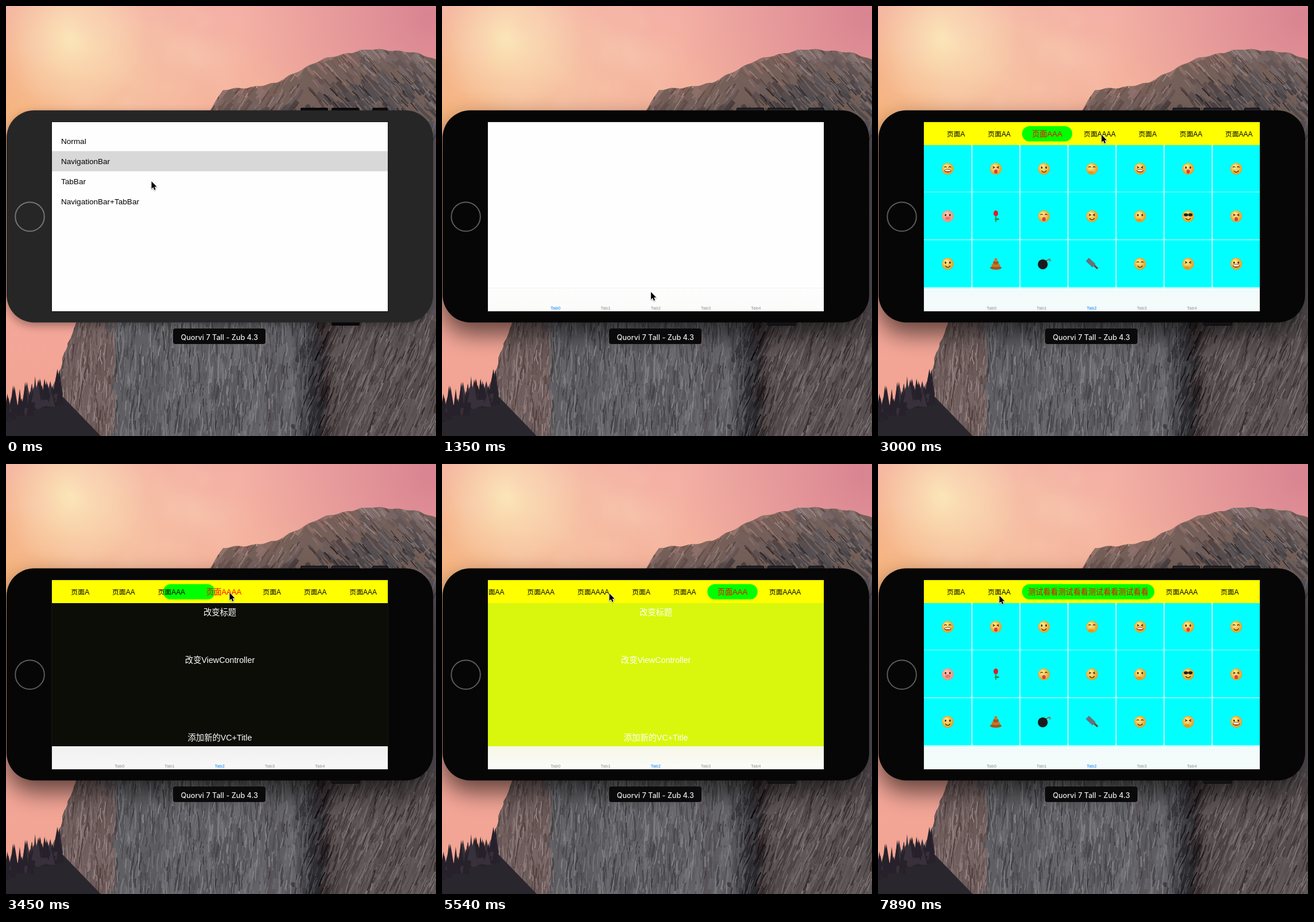
An HTML page with a canvas that plays this animation: 749x748 px, repeating every 8 s.

```html
<!DOCTYPE html>
<html lang="zh">
<head>
<meta charset="utf-8">
<title>Paging tabs</title>
<style>
  html, body { margin: 0; width: 100%; height: 100%; overflow: hidden; background: #f4ab97; }
  canvas { display: block; }
</style>
</head>
<body>
<canvas id="stage" width="749" height="748"></canvas>
<script>
const W = 749, H = 748, LOOP = 8000;
const FONT = '"Liberation Sans", Arial, "Noto Sans CJK SC", "Noto Sans CJK", sans-serif';
const SCREEN = { x: 80, y: 202, w: 585, h: 329 };
const PAGE_TOP = 242, BAR_TOP = 491;
const SIZE = 11.92, PAD = 19.88;
const stage = document.getElementById('stage').getContext('2d');
let g = stage;

// ---------- helpers ----------
const clamp = (v, a, b) => Math.max(a, Math.min(b, v));
const mix = (a, b, p) => a + (b - a) * p;
const ease = p => (1 - Math.cos(Math.PI * clamp(p, 0, 1))) / 2;
const times = (n, f) => Array.from({ length: n }, (_, i) => f(i));

let seed = 11;
function rnd(a = 0, b = 1) {
  seed = (seed * 16807) % 2147483647;
  return mix(a, b, seed / 2147483647);
}
function trace(pts) {
  g.beginPath();
  pts.forEach(([x, y]) => g.lineTo(x, y));
}
function poly(pts, fill) { trace(pts); g.fillStyle = fill; g.fill(); }
function line(pts, color, width = 1) {
  trace(pts);
  g.strokeStyle = color; g.lineWidth = width; g.stroke();
}
function rect(x, y, w, h, fill) { g.fillStyle = fill; g.fillRect(x, y, w, h); }
function round(x, y, w, h, r, fill) {
  g.beginPath(); g.roundRect(x, y, w, h, r);
  g.fillStyle = fill; g.fill();
}
function disc(x, y, r, fill, ry = r) {
  g.beginPath(); g.ellipse(x, y, r, ry, 0, 0, 7);
  g.fillStyle = fill; g.fill();
}
function arc(x, y, r, a, b, color, width = 1) {
  g.beginPath(); g.arc(x, y, r, a, b);
  g.strokeStyle = color; g.lineWidth = width; g.stroke();
}
function text(s, x, y, size, color, align = 'center') {
  g.font = size + 'px ' + FONT;
  g.textAlign = align;
  g.fillStyle = color;
  g.fillText(s, x, y + size * 0.36);
}
function glow(x, y, r, rgb, alpha) {
  const f = g.createRadialGradient(x, y, 0, x, y, r);
  f.addColorStop(0, `rgba(${rgb},${alpha})`);
  f.addColorStop(1, `rgba(${rgb},0)`);
  rect(x - r, y - r, 2 * r, 2 * r, f);
}
function ramp(y0, y1, ...colors) {
  const f = g.createLinearGradient(0, y0, 0, y1);
  colors.forEach((c, i) => f.addColorStop(i / (colors.length - 1), c));
  return f;
}
function layer(paint) {
  const c = document.createElement('canvas');
  c.width = W; c.height = H;
  g = c.getContext('2d');
  paint();
  g = stage;
  return c;
}

// ---------- wallpaper ----------
// A parabolic dome meets a gentle shoulder, which drops off steeply on the left.
function ridge(x) {
  const dome = 76 + 0.0018 * (x - 652) ** 2;
  const shoulder = 147 - 0.13 * (x - 378);
  const rough = Math.sin(x / 5) + Math.sin(x / 13);
  return (x < 378 ? 147 + (378 - x) * 1.5 : Math.min(dome, shoulder)) + rough;
}
function rockColor(x, y, jitter) {
  let light, warm;
  if (y < 200) {
    const depth = (y - ridge(x)) / 60;
    warm = clamp(32 - 20 * depth, 8, 32) * (x < 600 ? 1 : 0.6);
    light = 112 - 34 * clamp(depth, 0, 1);
  } else {
    const cleft = Math.exp(-(((x - 545) / 30) ** 2));
    warm = x < 190 ? 16 : x > 560 ? 8 : 0;
    light = (x < 545 ? 97 : 82) - 45 * cleft;
  }
  const v = light + jitter;
  return `rgb(${v + warm},${v - 1},${v + 4 - warm * 0.4})`;
}
function rock(n, y0, y1, size, width, contrast) {
  for (let i = 0; i < n; i++) {
    const x = rnd(65, W + 10), y = rnd(y0, y1), len = rnd(size * 0.3, size);
    const lean = y < 200 ? (x < 520 ? -0.7 : 0.9) : (x < 530 ? -0.06 : -0.4);
    const end = x + len * (lean + rnd(-0.15, 0.15));
    line([[x, y - len / 2], [mix(x, end, 0.5) + rnd(-2, 2), y], [end, y + len / 2]],
      rockColor(x, y, rnd(-contrast, contrast)), rnd(width / 3, width));
  }
}
function paintWallpaper() {
  rect(0, 0, W, H, ramp(0, H, '#f4b0a6', '#f5b39a', '#f4ab93', '#f4a799', '#f0a28e'));
  glow(740, 20, 330, '212,124,142', 0.85);
  glow(20, 190, 230, '246,180,116', 0.75);
  glow(200, 110, 170, '247,200,164', 0.7);
  glow(115, 55, 130, '252,236,188', 0.9);
  for (let i = 0; i < 60; i++) glow(rnd(0, 380), rnd(0, 180), rnd(15, 60), '250,205,180', rnd(0.05, 0.2));

  const slope = times(20, i => [mix(70, 128, i / 19) + rnd(-2, 2), mix(H - 50, 535, i / 19)]);
  g.save();
  trace([...slope, ...times(106, i => [330 + 4 * i, ridge(330 + 4 * i)]), [W, H], [60, H]]);
  g.clip();
  rect(0, 0, W, 200, '#756059');
  rect(0, 200, W, H, '#5c565c');
  rock(450, 70, 190, 30, 10, 12);
  rock(700, 70, 190, 20, 2.5, 42);
  rock(700, 540, H, 90, 24, 10);
  rock(2600, 530, H, 38, 2.4, 38);
  rock(200, 200, 540, 30, 4, 30);
  g.restore();

  const ground = x => 700 - 0.3 * x;
  poly([[0, ground(0)], [92, ground(92)], [165, H], [0, H]], '#2a262d');
  for (let i = 0; i < 70; i++) {
    const x = rnd(-4, 94), base = ground(x) + rnd(0, 26), h = rnd(18, 46), w = rnd(4, 8);
    poly([[x, base - h], [x + w, base], [x - w, base]], i % 3 ? '#26212a' : '#38303a');
  }
}

// ---------- emoji grid ----------
const INK = '#4a2508';
function ball(inner, outer) {
  const f = g.createRadialGradient(-3, -4, 1, 0, 0, 12);
  f.addColorStop(0, inner); f.addColorStop(1, outer);
  disc(0, 0, 10.3, f);
}
const pair = f => [-3.8, 3.8].forEach(f);
const eyes = [
  x => arc(x, -1.5, 2, 3.4, 6, INK, 1.3),
  x => disc(x, -2, 1.4, INK, 1.9),
  x => line([[x * 1.4, -4], [x * 0.6, -2.3], [x * 1.4, -0.8]], INK, 1.3)
];
const mouths = [
  () => { disc(0, 3.5, 6, '#8c3210', 3); disc(0, 3, 5, '#fff', 1.6); },
  () => disc(0, 5, 3, '#e03a4c', 3.4),
  () => arc(0, 1.5, 4.5, 0.4, 2.7, INK, 1.3),
  () => disc(-2, 7, 5, '#e59a1a', 3)
];
const shaded = () => { ball('#fff08f', '#dd9318'); pair(x => disc(x, -2.4, 3.8, '#26201c', 2.7)); mouths[2](); };
const things = {
  7: () => { ball('#fcc8b8', '#e98a78'); pair(eyes[1]); disc(0, 3.5, 4.5, '#e47a6c', 3); },
  8: () => { line([[0, 0], [0, 10]], '#2e8b35', 1.8); disc(2, 5, 4, '#2e8b35', 1.5); disc(0, -5, 4, '#dd1f2b', 5); },
  12: shaded,
  15: () => times(4, i => disc(0, 7 - 4.5 * i, 10 - 2.5 * i, i % 2 ? '#c9762b' : '#a9551b', 3.4)),
  16: () => { line([[3, -5], [10, -8], [11, -4]], '#a8522a', 1.6); disc(-2, 1, 8.6, '#1b1b1d'); },
  17: () => { g.rotate(0.75); rect(-11, -4, 16, 8, '#69717c'); rect(5, -2, 8, 3, '#7a3f1c'); }
};
function emojiPage() {
  rect(80, PAGE_TOP, 585, BAR_TOP - PAGE_TOP, '#0ff');
  for (let i = 1; i < 7; i++) rect(79 + 83.7 * i, PAGE_TOP, 1.7, 249, '#e8ffff');
  for (let i = 0; i < 3; i++) rect(80, 323 + 83 * i, 585, 0.8 + 0.4 * i, '#d0ffff');
  times(21, i => {
    g.save();
    g.translate(121.5 + 83.75 * (i % 7), 283 + 82.7 * Math.floor(i / 7));
    if (things[i]) things[i]();
    else { ball('#fff08f', '#dd9318'); pair(eyes[(i * 2) % 3]); mouths[i % 4](); }
    g.restore();
  });
}
function buttonPage(color) {
  rect(80, PAGE_TOP, 585, BAR_TOP - PAGE_TOP, color);
  text('改变标题', 372.5, 257.5, 14.3, '#fff');
  text('改变ViewController', 372.5, 341, 14.3, '#fff');
  text('添加新的VC+Title', 372.5, 475.5, 14.3, '#fff');
}

// ---------- tab strip ----------
const name = n => '页面' + 'A'.repeat(n);
const first = [1, 2, 3, 4, 1, 2, 3].map(name);
const grown = [...first, name(4)];
const renamed = grown.map((s, i) => i === 2 ? '测试看看'.repeat(4) : s);
// lead: how far the glide has run when it first shows
const events = [
  { t: 1800, sel: 2, tabs: first, lead: 999 },
  { t: 3450, sel: 3, tabs: first, lead: 118 },
  { t: 4500, sel: 6, tabs: first, lead: 60 },
  { t: 5085, sel: 6, tabs: grown, lead: 90 },
  { t: 6260, sel: 6, tabs: renamed, lead: 999 },
  { t: 7150, sel: 2, tabs: renamed, lead: 90 }
];
for (const e of events) {
  let x = PAD;
  e.cells = e.tabs.map(s => {
    const em = [...s].reduce((sum, c) => sum + (c === 'A' ? 0.667 : 1), 0);
    const cell = { s, x, w: em * SIZE + 2 * PAD };
    x += cell.w;
    return cell;
  });
  const pick = e.cells[e.sel];
  e.scroll = clamp(pick.x + pick.w / 2 - SCREEN.w / 2, 0, x + PAD - SCREEN.w);
}
function tabStrip(t) {
  const n = events.filter(e => e.t <= t).length - 1;
  const now = events[n], old = events[Math.max(0, n - 1)];
  const age = t - now.t + now.lead;
  const move = ease(age / 300), slide = ease((age + 27) / 300);
  const from = old.cells[old.sel], to = now.cells[now.sel];
  const left = SCREEN.x - mix(old.scroll, now.scroll, slide);

  rect(80, 202, 585, 40, '#ff0');
  round(left + mix(from.x, to.x, move), 209, mix(from.w, to.w, move), 26.5, 13.2, '#0f0');
  now.cells.forEach((c, i) => {
    const on = i === now.sel;
    text(c.s, left + c.x + c.w / 2, 222.3, on ? SIZE * 1.1 : SIZE, on ? '#f00' : '#000');
  });
  return now.sel;
}

// ---------- screens ----------
function tabBar(sel, top, bottom = '#fbfbfa') {
  rect(80, BAR_TOP, 585, 40, ramp(BAR_TOP, 531, top, bottom));
  for (let i = 0; i < 5; i++)
    text('Tab' + i, 197.7 + 87.25 * i, 525, 7.95, i === sel ? '#0a84f5' : '#8f8f8f');
}
function blankPage(sel) {
  rect(80, BAR_TOP - 1, 585, 1, '#f2f2f2');
  tabBar(sel, '#fdfdfd');
}
function list(t) {
  const tapped = t >= 600;
  rect(80, tapped ? 287.5 : 252.5, 585, 35, '#d8d8d8');
  if (tapped) rect(96, 357, 569, 1, '#dedede');
  ['Normal', 'NavigationBar', 'TabBar', 'NavigationBar+TabBar'].forEach((s, i) =>
    text(s, 96, 235.5 + 35 * i, 13.55, '#000', 'left'));
}
function screen(t) {
  const blank = () => rect(SCREEN.x, SCREEN.y, SCREEN.w, SCREEN.h, '#fefefe');
  g.save();
  g.beginPath(); g.rect(SCREEN.x, SCREEN.y, SCREEN.w, SCREEN.h); g.clip();
  blank();
  if (t < 1800) {
    if (t < 1050) list(t);
    if (t >= 750) {
      g.translate(0, SCREEN.h * (1 - ease((t - 650) / 400)));
      blank();
      blankPage(0);
    }
  } else {
    const sel = tabStrip(t);
    if (sel === 3) { buttonPage('#0b0d06'); tabBar(2, '#f0f0f0', '#f8f8f8'); }
    else if (sel === 6) { buttonPage('#d9f70c'); tabBar(2, '#f7f7e8'); }
    else if (t < 2400) blankPage(2);
    else { emojiPage(); tabBar(2, '#f2fbfb', '#f4fbfb'); }
  }
  g.restore();
}
function phone(active) {
  for (const [x, y, w] of [[513, 177, 48], [567, 177, 48], [638, 177, 27], [567, 547, 49]]) {
    round(x, y, w, 9, 2, '#0b0a0c');
    if (active) round(x + 1, y + 1, w - 2, 7, 1, '#2a262b');
  }
  g.save();
  g.shadowColor = `rgba(0,0,0,${active ? 0.6 : 0.35})`;
  g.shadowBlur = active ? 42 : 16;
  g.shadowOffsetY = active ? 20 : 6;
  round(1, 181.5, 743, 369, 48, active ? '#060606' : '#262626');
  g.restore();
  rect(79, 201, 587, 331, '#161616');
  arc(41.5, 366.5, 25.3, 0, 7, active ? '#5c5a5d' : '#77747a', 2);
  round(291, 561, 161, 27, 4, '#0a0a0a');
  g.font = '500 12.7px Inter, Roboto, sans-serif';
  g.textAlign = 'center';
  g.fillStyle = '#e9e9e9';
  g.fillText('Quorvi 7 Tall - Zub 4.3', 371.7, 580.7);
}

// ---------- pointer ----------
const moves = [
  { from: 900, to: 1450, x: 373, y: 513 },
  { from: 2100, to: 2250, x: 365, y: 468 },
  { from: 2250, to: 2850, x: 389, y: 223 },
  { from: 3750, to: 4350, x: 600, y: 220 },
  { from: 4640, to: 5070, x: 372, y: 479 },
  { from: 5230, to: 5530, x: 291, y: 224 },
  { from: 5530, to: 5970, x: 386, y: 257 },
  { from: 6260, to: 6850, x: 183, y: 216 },
  { from: 7300, to: 7880, x: 211, y: 228 }
];
function pointer(t) {
  let x = 253, y = 304;
  for (const m of moves) {
    const p = ease((t - m.from) / (m.to - m.from));
    x = mix(x, m.x, p);
    y = mix(y, m.y, p);
  }
  g.save();
  g.translate(x, y);
  g.shadowColor = 'rgba(0,0,0,.35)'; g.shadowBlur = 2; g.shadowOffsetY = 1;
  const arrow = [[0.5, 1], [0.5, 14], [3.4, 11.3], [5.4, 16], [7.6, 15], [5.6, 10.5], [9.6, 10.5], [0.5, 1]];
  g.lineJoin = 'round';
  line(arrow, '#fff', 1.8);
  g.shadowColor = 'transparent';
  poly(arrow, '#000');
  g.restore();
}

// ---------- loop ----------
// The picture advances in even steps, slightly shorter after 4.5 s.
const step = t => t < 4500 ? Math.floor(t / 150) * 150 : 4500 + Math.floor((t - 4500) / 147.3) * 147.3;
const wallpaper = layer(paintWallpaper);
const scene = active => layer(() => { g.drawImage(wallpaper, 0, 0); phone(active); });
const idle = scene(false), live = scene(true);
const start = performance.now();
function frame() {
  const t = step((performance.now() - start) % LOOP);
  g.drawImage(t < 450 ? idle : live, 0, 0);
  screen(t);
  pointer(t);
  requestAnimationFrame(frame);
}
frame();
</script>
</body>
</html>
```
